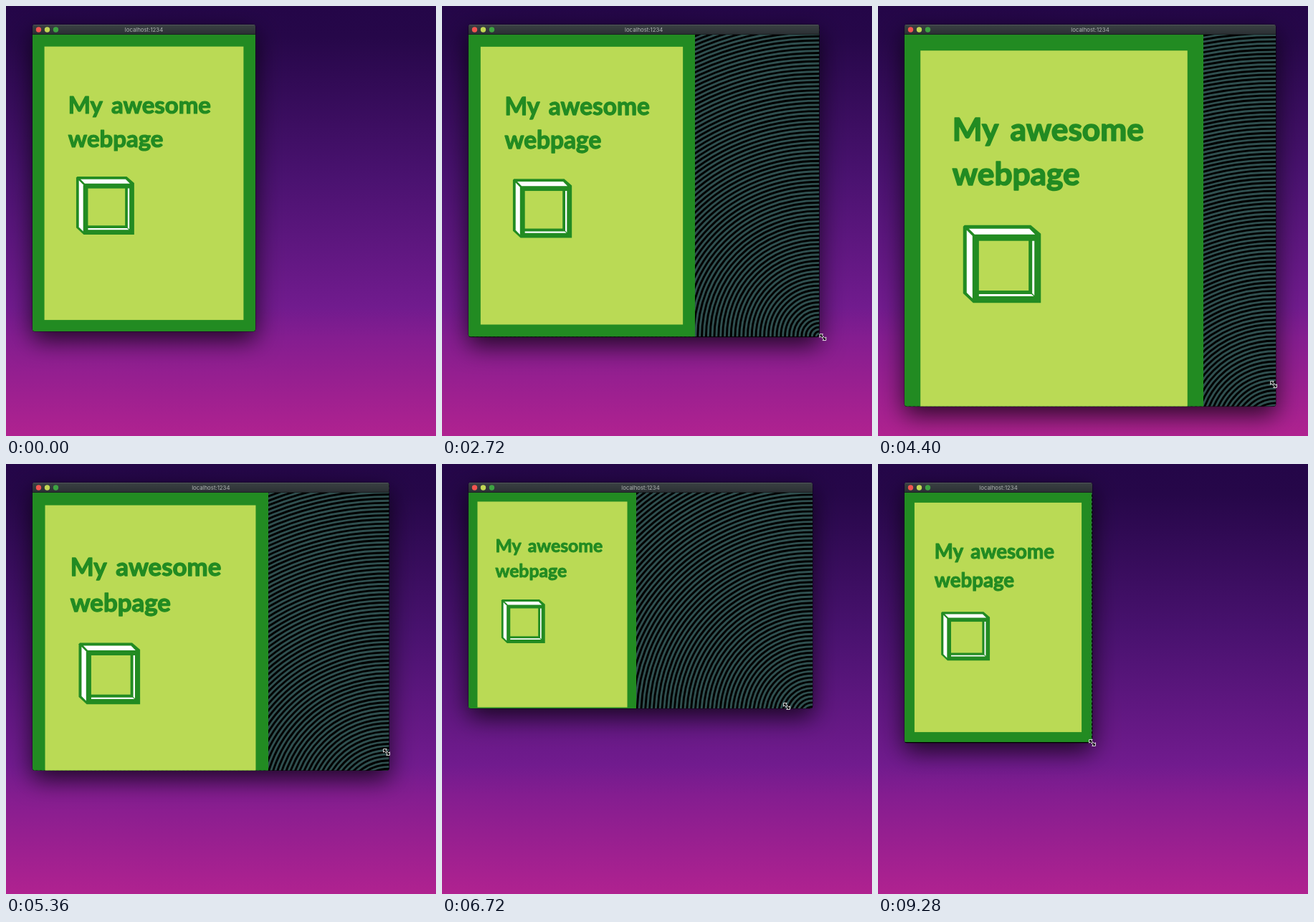
An HTML page with a canvas that plays this animation: 600 px wide and 600 px high, repeating every 9.36 s.

```html
<!DOCTYPE html>
<html lang="en">
<head>
<meta charset="utf-8">
<title>Resizing a page</title>
<style>
  html, body { margin: 0; width: 100%; height: 100%; overflow: hidden; background: #26074a; }
  canvas { display: block; width: 600px; height: 600px; }
</style>
</head>
<body>
<canvas id="stage" width="600" height="600"></canvas>
<script>
const ctx = document.getElementById('stage').getContext('2d');
const LOOP = 9360, STEP = 80, POINTER_FROM = 960;
const LEFT = 37, TOP = 26, BAR = 14, PAGE_TOP = TOP + BAR;
const GREEN = '#228b22', LIME = '#bada55';

// The pointer's drag: time, x, y. The window and the page trail behind it.
const DRAG = [
  [1120, 348, 454], [2000, 413, 458], [2880, 543, 464], [3180, 547, 551],
  [3900, 558, 596], [4400, 552, 528], [4850, 543, 481], [5360, 531, 402],
  [6220, 525, 352], [6530, 517, 341], [6720, 481, 338], [7680, 300, 340],
  [8900, 299, 389]
];

const clamp01 = u => Math.max(0, Math.min(1, u));

// Monotone cubic interpolation, so nothing overshoots a key.
function slope(i, axis) {
  const a = DRAG[i - 1], b = DRAG[i], c = DRAG[i + 1];
  if (!a || !c) return 0;
  const s = (b[axis] - a[axis]) / (b[0] - a[0]);
  const r = (c[axis] - b[axis]) / (c[0] - b[0]);
  return s * r <= 0 ? 0 : 2 * s * r / (s + r);
}

function dragAt(t, axis) {
  const next = DRAG.findIndex(key => key[0] > t);
  const i = next < 0 ? DRAG.length - 2 : Math.max(0, next - 1);
  const a = DRAG[i], b = DRAG[i + 1], d = b[0] - a[0];
  const u = clamp01((t - a[0]) / d), u2 = u * u, u3 = u2 * u;
  return (2 * u3 - 3 * u2 + 1) * a[axis] + (u3 - 2 * u2 + u) * d * slope(i, axis)
    + (3 * u2 - 2 * u3) * b[axis] + (u3 - u2) * d * slope(i + 1, axis);
}

function verticalGradient(y0, y1, stops) {
  const g = ctx.createLinearGradient(0, y0, 0, y1);
  stops.forEach(([at, color]) => g.addColorStop(at, color));
  return g;
}

function rect(color, x, y, w, h) {
  ctx.fillStyle = color;
  ctx.fillRect(x, y, w, h);
}

function polygon(color, points) {
  ctx.beginPath();
  points.forEach(([x, y]) => ctx.lineTo(x, y));
  ctx.closePath();
  ctx.fillStyle = color;
  ctx.fill();
}

function windowPath(right, bottom) {
  ctx.beginPath();
  ctx.roundRect(LEFT, TOP, right - LEFT, bottom - TOP, 3);
}

function drawBackdrop() {
  rect(verticalGradient(0, 600, [
    [0, '#240648'], [0.07, '#260749'], [0.4, '#4a1270'],
    [0.7, '#711b8e'], [0.77, '#841d90'], [1, '#b02290']
  ]), 0, 0, 600, 600);
}

function drawShadow(right, bottom) {
  ctx.save();
  ctx.shadowColor = 'rgba(0, 0, 0, 0.75)';
  ctx.shadowBlur = 34;
  ctx.shadowOffsetY = 12;
  windowPath(right, bottom);
  ctx.fillStyle = '#000';
  ctx.fill();
  ctx.restore();
  ctx.strokeStyle = 'rgba(0, 0, 0, 0.6)';
  ctx.lineWidth = 1;
  ctx.stroke();
}

function drawRings(cx, cy, right, bottom) {
  const period = 5.8;
  rect('#000', LEFT, PAGE_TOP, right - LEFT, bottom - PAGE_TOP);
  ctx.strokeStyle = '#2f4f4f';
  ctx.lineWidth = period / 2;
  for (let r = period * 0.75; r < 820; r += period) {
    ctx.beginPath();
    ctx.arc(cx, cy, r, Math.PI, Math.PI * 1.5);
    ctx.stroke();
  }
}

function drawCube(x, y, scale) {
  ctx.save();
  ctx.translate(x, y);
  ctx.scale(scale, scale);
  polygon(GREEN, [[2, 0], [94, 0], [108, 12], [108, 108], [14, 108], [0, 95], [0, 2]]);
  polygon('#fff', [[5, 7], [13, 15], [13, 102], [5, 94]]);
  polygon('#fff', [[8, 5], [92, 5], [100, 13], [16, 13]]);
  polygon('#fff', [[96, 22], [99, 22], [99, 98], [96, 95]]);
  polygon('#fff', [[22, 96], [95, 96], [98, 99], [22, 99]]);
  rect(LIME, 22, 22, 69, 69);
  ctx.restore();
}

function drawPage(bottom) {
  const w = Math.round((bottom - PAGE_TOP) * 0.75), h = w / 0.75;
  const border = w * 0.0533;
  rect(GREEN, LEFT, PAGE_TOP, w, h);
  rect(LIME, LEFT + border, PAGE_TOP + border, w - 2 * border, h - 2 * border);

  ctx.font = `bold ${w * 0.106}px Lato, sans-serif`;
  ctx.textAlign = 'left';
  ctx.wordSpacing = `${w * 0.013}px`;
  ctx.fillStyle = ctx.strokeStyle = GREEN;
  ctx.lineWidth = w * 0.004;
  ctx.lineJoin = 'round';
  ['My awesome', 'webpage'].forEach((line, i) => {
    const x = LEFT + w * 0.16, y = PAGE_TOP + w * (0.354 + i * 0.15);
    ctx.fillText(line, x, y);
    ctx.strokeText(line, x, y);
  });
  ctx.wordSpacing = '0px';
  drawCube(LEFT + w * 0.196, PAGE_TOP + w * 0.637, w / 415);
}

function drawTitleBar(right) {
  rect(verticalGradient(TOP, PAGE_TOP, [[0, '#3b4144'], [1, '#2a2f33']]), LEFT, TOP, right - LEFT, BAR);
  rect('#596064', LEFT, TOP, right - LEFT, 0.7);
  rect('#111517', LEFT, PAGE_TOP - 0.6, right - LEFT, 0.6);
  ['#f25450', '#c2d754', '#3da342'].forEach((color, i) => {
    ctx.beginPath();
    ctx.arc(45.5 + i * 12, 33, 3.7, 0, Math.PI * 2);
    ctx.fillStyle = color;
    ctx.fill();
  });
  ctx.font = '7.8px Inter, sans-serif';
  ctx.textAlign = 'center';
  ctx.fillStyle = '#b0b5b4';
  ctx.fillText('localhost:1234', (LEFT + right) / 2, 36);
}

function drawPointer(x, y) {
  ctx.save();
  ctx.translate(x, y);
  ctx.lineJoin = 'miter';
  ctx.lineWidth = 0.9;
  ctx.strokeStyle = '#fff';
  for (let i = 0; i < 2; i++) {
    polygon('#000', [[-4.4, -4.4], [0.2, -4.4], [-1.2, -2.9], [0.6, -1], [-1, 0.6], [-2.9, -1.2], [-4.4, 0.2]]);
    ctx.stroke();
    ctx.rotate(Math.PI);
  }
  ctx.restore();
}

function draw(t) {
  // Redrawing falls further behind as the drag goes on.
  const lag = 40 + 150 * clamp01((t - 3280) / 900);
  const right = dragAt(t - lag, 1), bottom = dragAt(t - lag, 2);
  const pageBottom = dragAt(t - lag * 2.6, 2);

  drawBackdrop();
  drawShadow(right, bottom);
  ctx.save();
  windowPath(right, bottom);
  ctx.clip();
  drawRings(right, pageBottom, right, bottom);
  drawPage(pageBottom);
  drawTitleBar(right);
  ctx.restore();
  if (t >= POINTER_FROM) drawPointer(dragAt(t, 1), dragAt(t, 2));
}

const start = performance.now();
function tick() {
  const t = (performance.now() - start) % LOOP;
  draw(Math.floor(t / STEP) * STEP);
  requestAnimationFrame(tick);
}
tick();
</script>
</body>
</html>
```
